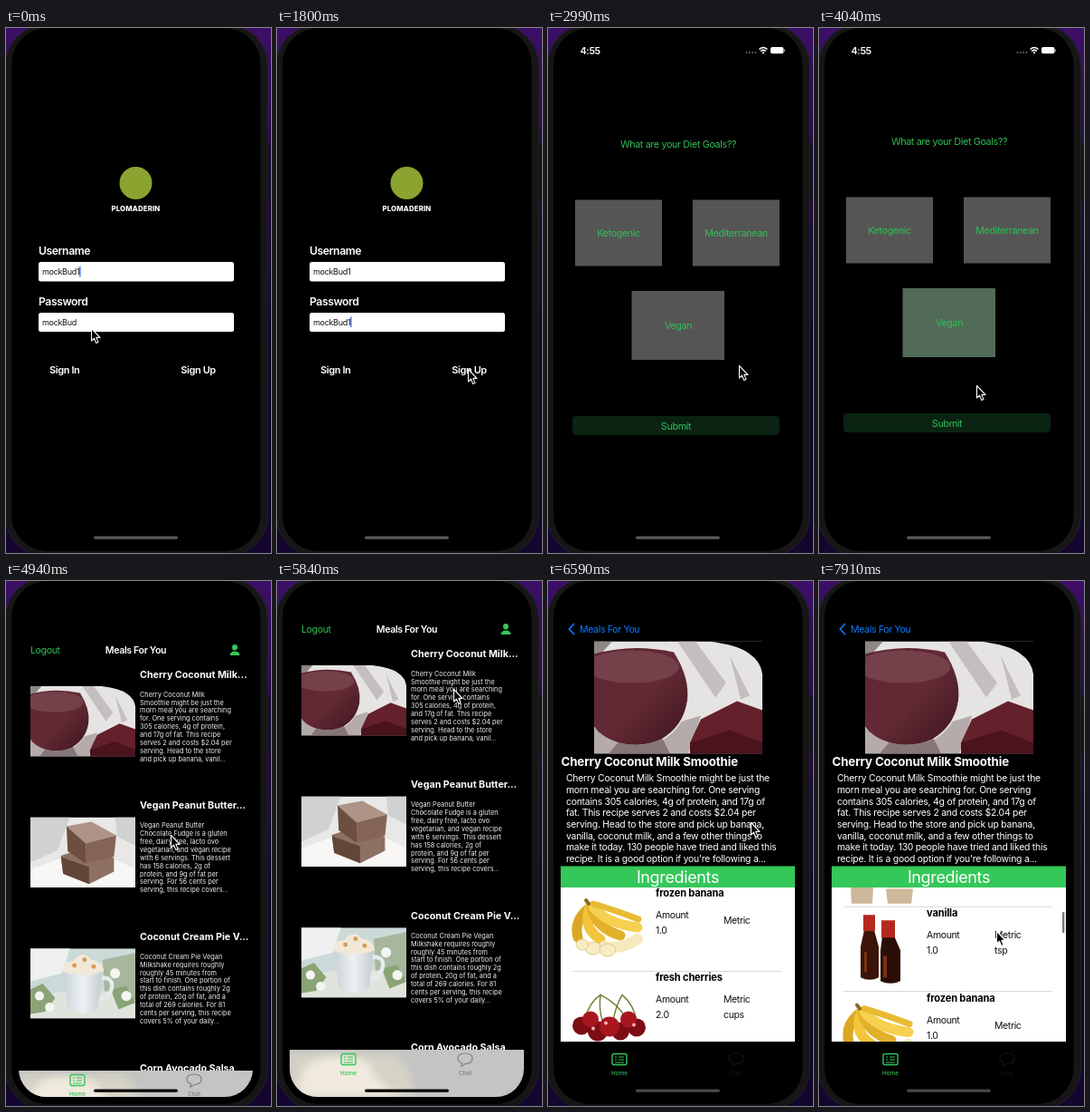
Write an HTML page that moves like this. It is 293x579 px and loops after 8 s.

```html
<!DOCTYPE html>
<html lang="en">
<head>
<meta charset="utf-8">
<title>Meal planner demo</title>
<style>
html, body { margin: 0; width: 100%; height: 100%; overflow: hidden; background: #160630; }
svg.stage { display: block; width: 100%; height: 100%; }
text { font: 400 10.8px Inter, "Open Sans", sans-serif; letter-spacing: -.035em; fill: #fff; white-space: pre; }
.mid { text-anchor: middle; }
.semi { font-weight: 600; }
.green { fill: #2fbf55; }
.blue { fill: #0a7aff; }
.nav { font-size: 10.6px; }
.label { font-size: 12.2px; font-weight: 600; }
.action { font-size: 11px; font-weight: 600; }
.input { font-size: 9px; fill: #111; }
.brand { font-size: 7.8px; font-weight: 800; letter-spacing: .02em; }
.meal { font-size: 10.7px; font-weight: 700; letter-spacing: 0; }
.small { font-size: 7.35px; letter-spacing: 0; fill: #f0f0f0; }
.headline { font-size: 13.3px; font-weight: 700; letter-spacing: -.01em; }
.body { font-size: 10.4px; letter-spacing: -.022em; }
.banner { font-size: 18px; letter-spacing: -.02em; }
.item { font-size: 11.1px; font-weight: 700; letter-spacing: -.015em; fill: #000; }
.cell { font-size: 10.5px; fill: #111; }
.tab { font-size: 6.3px; font-weight: 500; letter-spacing: 0; }
</style>
</head>
<body>
<svg class="stage" viewBox="0 0 293 579" xmlns="http://www.w3.org/2000/svg">
  <defs>
    <linearGradient id="desk" x2="0" y2="1">
      <stop offset="0" stop-color="#3c0f66"/><stop offset=".3" stop-color="#220a45"/>
      <stop offset=".6" stop-color="#10062a"/><stop offset="1" stop-color="#14062e"/>
    </linearGradient>
    <linearGradient id="berry" x2="1" y2="1">
      <stop offset="0" stop-color="#5c2630"/><stop offset=".5" stop-color="#632a35"/><stop offset="1" stop-color="#3f161e"/>
    </linearGradient>
    <linearGradient id="mug" x2="1">
      <stop offset="0" stop-color="#c9d3d8"/><stop offset=".5" stop-color="#eef1f2"/><stop offset="1" stop-color="#c3ccd0"/>
    </linearGradient>
    <filter id="soft"><feGaussianBlur stdDeviation="4"/></filter>
    <clipPath id="screen"><rect x="14" y="8" width="259" height="561" rx="31"/></clipPath>
    <clipPath id="photo"><rect width="186" height="124"/></clipPath>
    <clipPath id="listBox"><rect x="14" y="338" width="259" height="170"/></clipPath>

    <g id="smoothie" clip-path="url(#photo)">
      <path fill="#e6e3e3" d="M0 0H186V124H0Z"/>
      <path fill="#8f8785" d="M0 0H20L0 22Z"/>
      <path fill="#c4bfbf" d="M92 0H112L146 46L134 62ZM150 16L172 60L162 64Z"/>
      <path fill="#000" d="M126 0Q160 4 172 14Q184 22 186 36V0Z"/>
      <path fill="#b5abab" d="M98 88L118 82L104 124H0V96Z"/>
      <path fill="#64202b" d="M106 112L118 86L158 66L186 76V124H106Z"/>
      <path fill="#4a131d" d="M106 112L150 98L186 112V124H106Z"/>
      <path fill="url(#berry)" d="M0 14Q42 2 88 12Q106 40 103 66Q99 94 74 108Q52 118 28 112Q8 106 0 94Z"/>
      <ellipse cx="42" cy="28" rx="52" ry="18" fill="#74404a"/>
      <path fill="none" stroke="#e9e2e3" stroke-width="1.800" opacity=".8" d="M84 0Q112 38 103 70Q98 94 76 108"/>
      <path fill="#857678" d="M26 112Q52 118 76 108L84 124H16Z"/>
    </g>
    <g id="fudge" clip-path="url(#photo)">
      <path fill="#e9e8e6" d="M0 0H186V124H0Z"/>
      <path fill="#cfd2d0" d="M0 0H70L48 58L0 80ZM150 0H186V50L154 34Z"/>
      <path fill="#f8f7f6" d="M0 92L60 70L150 74L186 92V124H0Z"/>
      <path fill="#8d7062" d="M54 68L90 56L148 72V96L104 118L58 98Z"/>
      <path fill="#644638" d="M54 70L104 88V118L58 100Z"/>
      <path fill="#ad9486" d="M64 16L108 8L152 32L98 46Z"/>
      <path fill="#6d4f41" d="M64 16L98 46V82L66 60Z"/>
      <path fill="#846556" d="M98 46L152 32L148 70L98 82Z"/>
    </g>
    <g id="shake" clip-path="url(#photo)">
      <path fill="#cbd9d8" d="M0 0H186V124H0Z"/>
      <path fill="#eef1ef" d="M0 0H70L56 44L0 58Z"/>
      <path fill="#a6b79d" d="M128 20L186 8V96L132 88Z"/>
      <path fill="#dfe5dc" d="M0 88L60 76H140L186 92V124H0Z"/>
      <path fill="#8ba476" d="M0 72L22 62L44 88L26 112L0 116ZM142 72L170 66L186 96L156 108Z"/>
      <g fill="#f5f6f2"><circle cx="16" cy="84" r="8"/><circle cx="34" cy="104" r="8"/><circle cx="150" cy="44" r="9"/><circle cx="170" cy="84" r="9"/></g>
      <path fill="none" stroke="#e7ebec" stroke-width="7" d="M122 52Q148 50 144 70T118 90"/>
      <path fill="url(#mug)" d="M58 38H128L120 106Q92 124 66 106Z"/>
      <path fill="#f1e8d8" d="M55 40Q56 22 76 22Q90 2 108 20Q128 22 130 40Q92 54 55 40Z"/>
      <g fill="#d79c56"><circle cx="78" cy="30" r="4"/><circle cx="96" cy="20" r="4"/><circle cx="112" cy="32" r="4"/></g>
    </g>

    <g id="banana" stroke-linecap="round" fill="none">
      <path stroke="#dba722" stroke-width="11" d="M45 24Q28 38 33 56"/>
      <path stroke="#f2c53a" stroke-width="11" d="M46 24Q38 46 58 58"/>
      <path stroke="#e3b02a" stroke-width="11" d="M48 24Q54 46 80 54"/>
      <path stroke="#f6d050" stroke-width="11" d="M50 22Q62 40 99 45"/>
      <path stroke="#e9bb33" stroke-width="7" d="M50 19Q74 26 100 36"/>
      <path stroke="#8a6a20" stroke-width="4" d="M42 15L45 19"/>
      <path stroke="#f6e9bd" stroke-width="12" d="M62 66Q82 70 99 58"/>
      <g fill="#f7ecc4" stroke="#e3cd86"><ellipse cx="50" cy="68" rx="9" ry="7"/><ellipse cx="66" cy="70" rx="9" ry="7"/><ellipse cx="38" cy="64" rx="7" ry="6"/></g>
    </g>
    <g id="cherries">
      <path fill="none" stroke="#6d7b32" stroke-width="1.400" d="M40 54Q46 34 58 26Q56 42 60 54M58 26Q78 36 86 52M82 26Q74 40 72 56M82 26Q96 38 98 56"/>
      <g fill="#7d0d14"><circle cx="37" cy="60" r="10"/><circle cx="55" cy="66" r="11"/><circle cx="80" cy="66" r="10"/><circle cx="98" cy="62" r="10"/></g>
      <g fill="#a8161f"><circle cx="68" cy="61" r="11"/><circle cx="47" cy="53" r="9"/><circle cx="89" cy="53" r="9"/></g>
      <g fill="#f0b0b0"><circle cx="64" cy="57" r="2"/><circle cx="50" cy="63" r="2"/><circle cx="95" cy="59" r="2"/></g>
    </g>
    <g id="milk">
      <path fill="#eee6da" d="M33 36H62L59 90H36ZM72 40H106L102 90H76Z"/>
      <path fill="#cdb89c" d="M35 70H60L59 90H36ZM74 74H104L102 90H76Z"/>
    </g>
    <g id="vanilla">
      <path fill="#3a1408" d="M50 26H61L66 44V78Q56 83 46 78V44Z"/>
      <path fill="#2b0f07" d="M70 32H83L90 48V82Q79 87 68 82V48Z"/>
      <path fill="#b5281f" d="M49 9H62V27H49ZM69 15H84V34H69Z"/>
      <path fill="#7a3213" d="M50 50H53V72H50ZM71 54H75V78H71Z"/>
    </g>
    <g id="tabIcons">
      <g fill="none" stroke="#34c759" stroke-width="1.400">
        <rect x="71" y="521.500" width="16" height="12" rx="2"/>
        <path d="M74 525H76M78 525H84M74 528H76M78 528H84M74 531H84" stroke-width="1"/>
      </g>
      <text class="tab mid green" x="79" y="545">Home</text>
    </g>
    <path id="bubble" fill="none" stroke-width="1.200" d="M203 535Q205 534 205 532Q200 530 200 526.500Q200 521 208 521T216 526.500T208 532.500Q206 535 203 535Z"/>
  </defs>

  <rect width="293" height="579" fill="url(#desk)"/>
  <rect x="289" y="127" width="3" height="64" fill="#111013"/>
  <rect x="-1" y="-4" width="290.500" height="587" rx="46" fill="#161617" stroke="#222224"/>
  <rect x="6" y="0" width="275.500" height="577" rx="40" fill="#000"/>

  <g clip-path="url(#screen)">
    <g id="login"></g>
    <g id="diet"></g>
    <g id="home">
      <rect x="14" y="8" width="259" height="561"/>
      <g id="meals"></g>
      <g id="detail"></g>
      <g id="lightTab">
        <rect x="14" y="517" width="259" height="52" fill="#c3c5c3"/>
        <g filter="url(#soft)">
          <path fill="#d6d2c6" d="M14 522H130Q152 540 150 569H14Z"/>
          <path fill="#efeadd" d="M24 569Q22 526 60 524T104 538T140 569Z"/>
        </g>
        <use href="#tabIcons"/><use href="#bubble" stroke="#7c7d7d"/>
        <text class="tab mid" x="208" y="545" style="fill:#7c7d7d">Chat</text>
      </g>
      <g id="darkTab">
        <rect x="14" y="508" width="259" height="61"/>
        <use href="#tabIcons"/><use href="#bubble" stroke="#151515"/>
        <text class="tab mid" x="208" y="545" style="fill:#161616">Chat</text>
      </g>
    </g>
    <g id="status" fill="#fff">
      <text class="semi" x="35.500" y="28.500">4:55</text>
      <path stroke="#777" stroke-width="1.800" stroke-linecap="round" stroke-dasharray="0 3.300" d="M219.500 27H230"/>
      <path fill="none" stroke="#fff" stroke-width="1.600" d="M233.500 23.500Q238 19.500 242.500 23.500M235.200 25.600Q238 23.200 240.800 25.600"/>
      <circle cx="238" cy="27.400" r="1.100"/>
      <rect x="246" y="21" width="14.500" height="7.300" rx="2"/><rect x="261" y="23.500" width="1" height="2.500" fill="#999"/>
    </g>
  </g>
  <rect id="homeBar" x="97" y="560.500" width="93" height="3.200" rx="1.600"/>
  <path id="pointer" fill="#000" stroke="#fff" stroke-width="1.100" stroke-linejoin="round" d="M.5 .5V14L3.500 11.200L5.700 16.400L8 15.400L5.800 10.400H10Z"/>
</svg>

<script>
const LOOP = 8000;
const USER = 'mockBud1';
const $ = id => document.getElementById(id);
const text = (x, y, cls, str) => `<text x="${x}" y="${y}" class="${cls}">${str}</text>`;
const rect = (x, y, w, h, fill, extra = '') => `<rect x="${x}" y="${y}" width="${w}" height="${h}" fill="${fill}" ${extra}/>`;
const lines = (x, y, step, cls, rows) => rows.map((row, i) => text(x, y + i * step, cls, row)).join('');
const show = (id, on) => { $(id).style.display = on ? '' : 'none'; };
const move = (id, x, y) => $(id).setAttribute('transform', `translate(${x} ${y})`);

$('login').innerHTML =
  '<circle cx="143.5" cy="171" r="18" fill="#8ba32f"/>' +
  text(143.5, 201.5, 'brand mid', 'PLOMADERIN') +
  text(36, 250, 'label', 'Username') + text(36, 305.5, 'label', 'Password') +
  rect(36, 258, 216, 21.5, '#fff', 'rx="2.5"') + rect(36, 314, 216, 21, '#fff', 'rx="2.5"') +
  `<text id="name" class="input" x="40" y="272">${USER}</text>` +
  '<text id="pass" class="input" x="40" y="327.5"></text>' +
  rect(0, 263, 1.3, 11.5, '#3565f0', 'id="nameCaret"') + rect(0, 318.5, 1.3, 11.5, '#3565f0', 'id="passCaret"') +
  text(64.7, 380.5, 'action mid', 'Sign In') + text(212.5, 380.5, 'action mid', 'Sign Up');

$('diet').innerHTML = rect(14, 8, 259, 561, '#000') +
  text(144, 129, 'mid green', 'What are your Diet Goals??') +
  rect(30, 186.5, 96, 73, '#555') + rect(160, 186.5, 96, 73, '#555') +
  rect(92.5, 287, 102.5, 76, '#555', 'id="vegan"') +
  rect(27, 425, 229, 21, '#0a2313', 'rx="4"') +
  text(78, 227, 'mid green', 'Ketogenic') + text(208, 227, 'mid green', 'Mediterranean') +
  text(144, 328.7, 'mid green', 'Vegan') + text(141.5, 439.5, 'mid green', 'Submit');

const meals = [
  ['Cherry Coconut Milk...', 'smoothie', ['Cherry Coconut Milk', 'Smoothie might be just the', 'morn meal you are searching',
    'for. One serving contains', '305 calories, 4g of protein,', 'and 17g of fat. This recipe', 'serves 2 and costs $2.04 per',
    'serving. Head to the store', 'and pick up banana, vanil...']],
  ['Vegan Peanut Butter...', 'fudge', ['Vegan Peanut Butter', 'Chocolate Fudge is a gluten', 'free, dairy free, lacto ovo',
    'vegetarian, and vegan recipe', 'with 6 servings. This dessert', 'has 158 calories, 2g of', 'protein, and 9g of fat per',
    'serving. For 56 cents per', 'serving, this recipe covers...']],
  ['Coconut Cream Pie V...', 'shake', ['Coconut Cream Pie Vegan', 'Milkshake requires roughly', 'roughly 45 minutes from',
    'start to finish. One portion of', 'this dish contains roughly 2g', 'of protein, 20g of fat, and a', 'total of 269 calories. For 81',
    'cents per serving, this recipe', 'covers 5% of your daily...']],
];
$('meals').innerHTML =
  text(27, 57, 'nav green', 'Logout') + text(143.5, 57, 'nav mid semi', 'Meals For You') +
  '<path fill="#34c759" d="M253 47a3 3.300 0 0 1 0 6.600a3 3.300 0 0 1 0-6.600M247.500 59Q248 54.500 253 54.500T258.500 59Z"/>' +
  meals.map(([title, photo, rows], i) => `<g transform="translate(0 ${i * 144.6})">` +
    text(148, 83.5, 'meal', title) +
    `<use href="#${photo}" transform="translate(27 93) scale(.624)"/>` +
    lines(148, 104.6, 8.9, 'small', rows) + '</g>').join('') +
  text(148, 517.5, 'meal', 'Corn Avocado Salsa');

const ROW = 93.4;
const items = [
  ['frozen banana', '1.0', '', 'banana'], ['fresh cherries', '2.0', 'cups', 'cherries'],
  ['coconut milk', '1.0', 'cups', 'milk'], ['vanilla', '1.0', 'tsp', 'vanilla'],
  ['frozen banana', '1.0', '', 'banana'],
];
$('detail').innerHTML = rect(14, 8, 259, 561, '#000') +
  '<path fill="none" stroke="#0a7aff" stroke-width="1.8" stroke-linecap="round" d="M28.500 47.500L23.500 53L28.500 58.500"/>' +
  text(35, 57, 'nav blue', 'Meals For You') +
  '<use href="#smoothie" x="51" y="66.500"/>' +
  text(14.5, 203.5, 'headline', 'Cherry Coconut Milk Smoothie') +
  lines(20, 221.3, 12.66, 'body', ['Cherry Coconut Milk Smoothie might be just the', 'morn meal you are searching for. One serving',
    'contains 305 calories, 4g of protein, and 17g of', 'fat. This recipe serves 2 and costs $2.04 per', 'serving. Head to the store and pick up banana,',
    'vanilla, coconut milk, and a few other things to', 'make it today. 130 people have tried and liked this', "recipe. It is a good option if you're following a..."]) +
  rect(14, 314.5, 259, 23.5, '#34c759') + text(143.5, 332.6, 'banner mid', 'Ingredients') +
  '<g clip-path="url(#listBox)">' + rect(14, 337, 259, 171, '#fff') + '<g id="items">' +
  items.map(([name, amount, unit, icon], i) => `<g transform="translate(0 ${337 + i * ROW})">` +
    `<use href="#${icon}"/>` + text(119, 11, 'item', name) +
    text(119, 35, 'cell', 'Amount') + text(119, 52, 'cell', amount) +
    text(194, unit ? 35 : 41, 'cell', 'Metric') + text(194, 52, 'cell', unit) +
    rect(27, ROW - .4, 231, .8, '#d0d0d2') + '</g>').join('') +
  '</g>' + rect(269, 338, 2.4, 23, '#777', 'id="scrollBar" rx="1.2"') + '</g>';

// [time, x, y]; a row without a position hides the pointer.
const pointerSteps = [
  [0, 94, 331], [150, 94, 328], [300, 94, 324], [600], [1200, 100, 328], [1350, 128, 340], [1500, 168, 358],
  [1650, 200, 372], [1800, 211, 376], [2250, 211, 372], [3290, 208, 362], [3440, 182, 342], [3590, 165, 334],
  [3740, 162, 333], [3890, 168, 360], [4040, 174, 394], [4190, 175, 426], [4640, 179, 390], [4940, 182, 280],
  [5240, 184, 175], [5390, 202, 99], [5690, 198, 109], [5840, 195, 119], [6140, 196, 122], [6290, 205, 165],
  [6440, 216, 225], [6590, 224, 266], [6730, 222, 325], [6880, 214, 390], [7030, 206, 435], [7180, 202, 440],
  [7330, 200, 380], [7480, 196, 287], [7630, 196, 320], [7780, 196, 360], [7910, 196, 386],
];
const scrollSteps = [[0, 0], [7330, 60], [7480, 150], [7630, 205], [7780, 238], [7910, 258]];
const current = (steps, t) => steps.findLast(step => step[0] <= t);

// Critically damped slide, advanced in even steps; 1 is fully away, 0 is settled.
function slide(t, start, end, count, rate) {
  if (t < start) return 1;
  const k = Math.floor((t - start) / (end - start) * (count - 1) + .05);
  const x = (k + .25) * rate;
  return k >= count - 1 ? 0 : (1 + x) * Math.exp(-x);
}

function draw(t) {
  const dietAway = slide(t, 2100, 3140, 8, 1.176);
  const homeAway = slide(t, 4340, 5240, 7, 1.176);
  const detailAway = slide(t, 6140, 6590, 4, 2.2);
  const inDetail = t >= 6440;

  $('pass').textContent = t < 600 ? USER.slice(0, -1) : USER;
  for (const field of ['name', 'pass'])
    $(field + 'Caret').setAttribute('x', 40 + $(field).getComputedTextLength());
  show('nameCaret', t < 150);
  show('passCaret', t >= 300 && !(t >= 1350 && t < 1650));

  show('diet', dietAway < 1);
  move('diet', 0, Math.round(dietAway * 561));
  $('vegan').setAttribute('fill', t < 3740 ? '#555' : '#526b58');
  show('status', t >= 2400 && t < 4490);

  show('home', homeAway < 1);
  move('home', 0, Math.round(homeAway * 561));
  move('meals', Math.round((detailAway - 1) * 78), 0);
  show('detail', detailAway < 1);
  move('detail', Math.round(detailAway * 259), 0);
  show('lightTab', !inDetail);
  show('darkTab', inDetail);
  $('homeBar').setAttribute('fill', inDetail ? '#484848' : t >= 4790 ? '#000' : '#5a5a5a');

  const scroll = current(scrollSteps, t)[1];
  move('items', 0, -scroll);
  show('scrollBar', scroll > 0);
  move('scrollBar', 0, scroll * .105);

  const [, x, y] = current(pointerSteps, t);
  show('pointer', x !== undefined);
  if (x !== undefined) move('pointer', x, y);
}

const began = performance.now();
function tick() {
  draw((performance.now() - began) % LOOP);
  requestAnimationFrame(tick);
}
tick();
</script>
</body>
</html>
```
